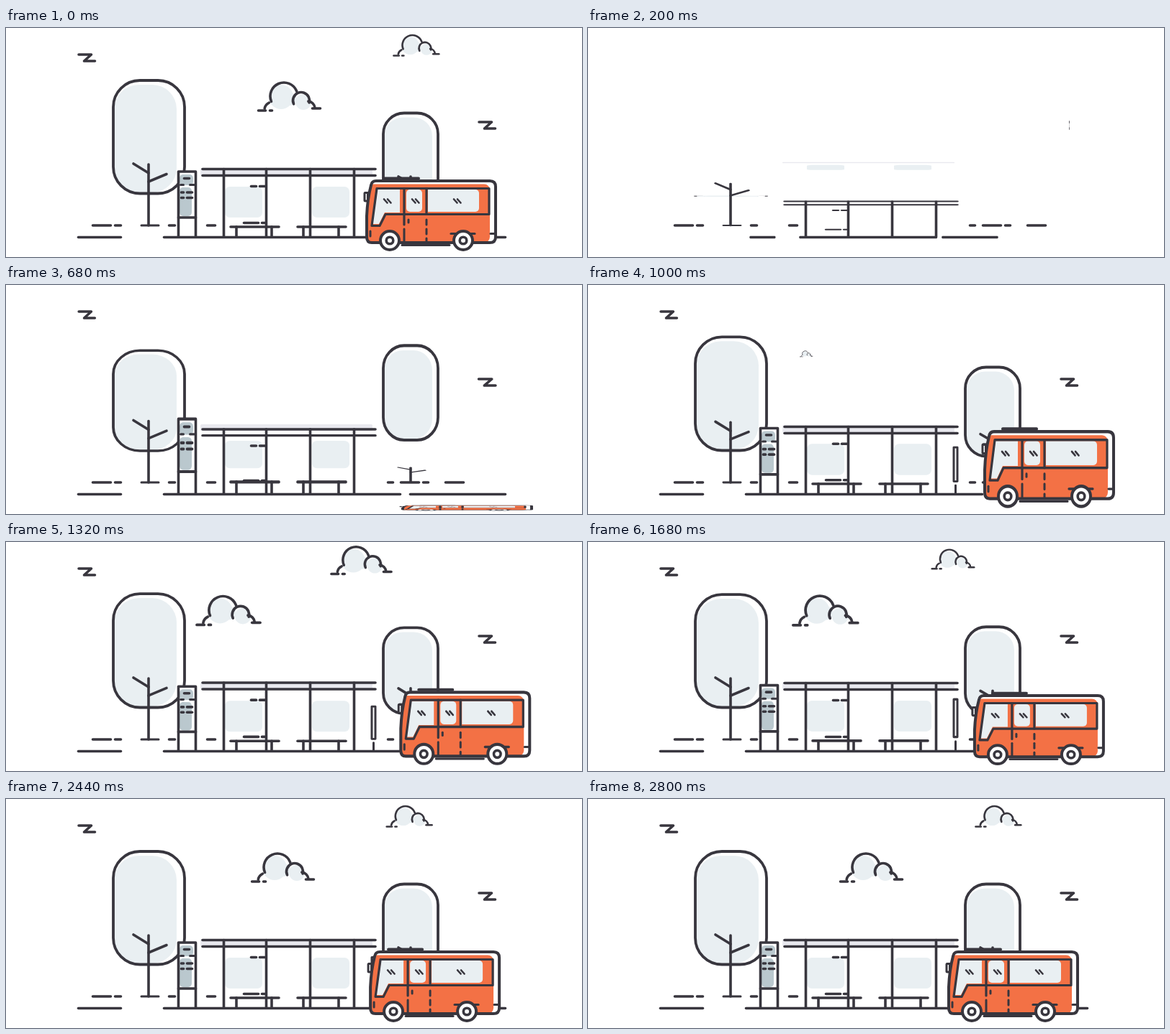
An HTML page with a canvas that plays this animation: 800x319 px, repeating every 2840 ms.

```html
<!DOCTYPE html>
<html lang="en">
<head>
<meta charset="utf-8">
<title>Bus stop</title>
<style>
html, body { margin: 0; width: 100%; height: 100%; overflow: hidden; background: #fff; }
canvas { display: block; }
</style>
</head>
<body>
<canvas id="stage" width="800" height="319"></canvas>
<script>
const ctx = document.getElementById('stage').getContext('2d');
const INK = '#38363e', PALE = '#e9eff2', GREY = '#bac8ce', ORANGE = '#f37145', WHITE = '#fff';
const LOOP = 2840, STEP = 40, WEIGHT = 3.6;
let now = 0;

// Easing
const elastic = p => p >= 1 ? 1 : 1 - 2 ** (-10 * p) * Math.cos(p * Math.PI * 2 / 0.3);
const back = p => p >= 1 ? 1 : 1 + 2.70158 * (p - 1) ** 3 + 1.70158 * (p - 1) ** 2;
const glide = start => {
  const p = Math.min(1, Math.max(0, (now - start) / (2800 - start)));
  return (1 - Math.cos(Math.PI * p)) / 2;
};

// Draws a part scaled about (x, y) on the given axes once its start time has come.
function grow({ start, time, x = 0, y = 0, axis = 'y', ease = elastic }, draw) {
  if (now <= start) return;
  const k = ease((now - start) / time);
  ctx.save();
  ctx.translate(x, y);
  ctx.scale(axis === 'y' ? 1 : k, axis === 'x' ? 1 : k);
  ctx.translate(-x, -y);
  draw();
  ctx.restore();
}

// Drawing helpers
function stroke(width = WEIGHT) {
  ctx.lineWidth = width;
  ctx.strokeStyle = INK;
  ctx.stroke();
}
function trace(points) {
  ctx.beginPath();
  for (let i = 0; i < points.length; i += 2) ctx.lineTo(points[i], points[i + 1]);
}
function line(points, width) {
  trace(points);
  stroke(width);
}
function dashes(y, ends, width) {
  for (let i = 0; i < ends.length; i += 2) line([ends[i] + 1.5, y, ends[i + 1] - 1.5, y], width);
}
function box(x1, y1, x2, y2, r, fill, width) {
  ctx.beginPath();
  ctx.roundRect(x1, y1, x2 - x1, y2 - y1, r);
  if (fill) { ctx.fillStyle = fill; ctx.fill(); }
  if (width) stroke(width);
}
function disc(x, y, r, fill, width) {
  ctx.beginPath();
  ctx.arc(x, y, r, 0, 7);
  ctx.fillStyle = fill;
  ctx.fill();
  if (width) stroke(width);
}
function arc(x, y, r, from, to) {
  ctx.beginPath();
  ctx.arc(x, y, r, from * Math.PI / 180, to * Math.PI / 180);
  stroke();
}

function crown(x1, y1, x2, y2, r, gap) {
  box(x1, y1, x2, y2, r, WHITE);
  box(x1 + 1.5, y1 + 6, x2 - gap, y2 - 1.5, r - 3, PALE);
  box(x1, y1, x2, y2, r, null, WEIGHT + 0.2);
}

function trees() {
  grow({ start: 198, time: 1550, y: 235 }, () => crown(149, 73, 248, 230.5, 37, 11));
  grow({ start: 123, time: 1470, y: 275 }, () => {
    line([198, 190, 198, 275]);
    line([177, 189, 198, 202]);
    line([198, 214, 223, 203.5]);
    line([188, 275, 212, 275], 3);
  });

  const hop = Math.min(1, Math.max(0, (now - 340) / 680));
  ctx.save();
  ctx.translate(0, -29 * Math.sin(Math.PI * hop));
  grow({ start: 316, time: 1750, y: 180 }, () => crown(524, 118.5, 600, 240, 29, 8));
  ctx.restore();
  grow({ start: 636, time: 1600, y: 275 }, () => {
    line([562, 207, 562, 275]);
    line([545, 207, 562, 217]);
    line([562, 229, 582, 220]);
    line([552, 275, 574, 275], 3);
  });
}

function shelter() {
  grow({ start: 173, time: 1620, y: 185 }, () => {
    box(270, 195, 509, 205.5, 2, '#e9e9ef');
    box(304, 221, 356, 264, 7, PALE);
    box(425, 221, 477, 264, 7, PALE);
  });
  grow({ start: 134, time: 1570, y: 291 }, () => {
    for (const y of [196.5, 205.5]) line([273, y, 513, y]);
    for (const x of [302.5, 361.5, 422.5, 483.5]) line([x, 196.5, x, 291]);
    dashes(220.5, [339, 349, 351, 361]);
    dashes(271.5, [329, 352, 354, 361]);
  });
  grow({ start: 348, time: 1750, y: 291 }, () => {
    for (const x of [311, 404]) {
      line([x + 1, 277, x + 68, 277]);
      line([x + 9, 277, x + 9, 291]);
      line([x + 58, 277, x + 58, 291]);
    }
  });
}

function timetable() {
  grow({ start: 337, time: 1750, y: 291 }, () => {
    box(239.5, 200, 263.5, 264, 0, WHITE);
    box(241, 204, 260, 219, 5, GREY);
    box(241, 222, 258, 262, 5, GREY);
    line([239.5, 291, 239.5, 200, 263.5, 200, 263.5, 291]);
    line([239.5, 264, 263.5, 264]);
    dashes(209.5, [246, 256]);
    dashes(218.5, [241, 248, 254, 263], 3);
    dashes(229, [242, 248, 250, 260]);
    dashes(236.5, [242, 248, 250, 260]);
  });
}

function stopPost() {
  grow({ start: 890, time: 1600, y: 291 }, () => {
    box(508, 220.5, 513, 272, 0, WHITE, 3);
    line([510.5, 278, 510.5, 291], 3);
  });
}

function ground() {
  dashes(275, [119, 147, 150, 161, 225, 236, 278, 292, 529, 539, 547, 575, 578, 588, 609, 637]);
  grow({ start: 122, time: 510, x: 397, axis: 'x', ease: back }, () =>
    dashes(291.5, [99, 161, 218, 549, 560, 695]));
}

function bird(x, y, start) {
  grow({ start, time: 1200, x: x + 11.5, axis: 'x' }, () =>
    line([x, y, x + 17.5, y, x + 7.5, y + 9, x + 22.5, y + 9]));
}

function cloud(x, y, size, start, anchor) {
  grow({ start, time: 1600, x, y: anchor, axis: 'xy' }, () => {
    ctx.translate(x, y);
    ctx.scale(size, size);
    disc(-11, 0, 17, PALE);
    disc(2, 3, 9, PALE);
    disc(20, 7, 11, PALE);
    arc(-7, -1, 19, 157, 340);
    arc(17, 5, 11.5, 155, 375);
    arc(-23, 18, 11, 190, 245);
    arc(26, 16, 10, 275, 355);
    dashes(19, [-44, -31, -28, -22]);
    dashes(16, [31, 45]);
  });
}

function wheel(x) {
  disc(x, 296, 13, WHITE, 4);
  disc(x, 296, 4.8, WHITE, 3.6);
}

function busBody() {
  ctx.beginPath();
  ctx.moveTo(514, 213);
  ctx.lineTo(672, 213);
  ctx.quadraticCurveTo(680, 213, 680, 221);
  ctx.lineTo(680, 291);
  ctx.quadraticCurveTo(680, 299, 672, 299);
  ctx.lineTo(508, 299);
  ctx.quadraticCurveTo(501, 299, 501, 291);
  ctx.lineTo(501, 262);
  ctx.quadraticCurveTo(502, 238, 507, 219);
  ctx.quadraticCurveTo(508, 213, 514, 213);
}

function bus() {
  ctx.save();
  ctx.translate(50 * (1 - glide(1060)), 0);
  grow({ start: 665, time: 1615, y: 315 }, () => {
    line([526, 209.5, 573, 209.5], 4);
    box(498, 229.5, 502.5, 241, 1, WHITE, 3);
    line([499, 229.5, 507, 229.5], 3);

    busBody();
    ctx.fillStyle = WHITE;
    ctx.fill();
    ctx.save();
    ctx.clip();
    box(500, 217.5, 672, 299, [8, 8, 8, 0], ORANGE);
    ctx.restore();

    // Glass
    trace([516, 225, 547, 225, 547, 257, 526, 257, 518, 273, 509, 273]);
    ctx.fillStyle = PALE;
    ctx.fill();
    box(556, 225, 578, 256, 5, PALE);
    box(586, 225, 657, 256, [0, 5, 5, 0], PALE);
    for (const x of [530, 569, 627]) {
      line([x - 5, 238.5, x - 0.5, 243.5], 2.6);
      line([x, 238.5, x + 4.5, 243.5], 2.6);
    }

    // Frames, door and trim
    line([508, 275.5, 515, 223.5, 671, 223.5, 671, 259.5, 527, 259.5, 519, 275.5, 508, 275.5], 3.2);
    line([553, 223.5, 553, 274], 3.2);
    line([584, 223.5, 584, 259.5], 3.2);
    for (const [x, top, end] of [[553, 280, 297], [559, 267, 271], [584, 267, 274], [584, 280, 287], [584, 293, 297], [506, 283, 290]])
      line([x, top, x, end], 3);
    line([618, 286.5, 651, 286.5], 3.2);
    line([673, 286.5, 679, 286.5], 3);
    busBody();
    stroke(4);
    line([550, 302.5, 616, 302.5], 3);
    wheel(533);
    wheel(635);
  });
  ctx.restore();
}

function render(time) {
  const tick = Math.floor(time % LOOP / STEP) * STEP;
  now = tick || LOOP;
  ctx.setTransform(1, 0, 0, 1, 0, 0);
  ctx.fillStyle = WHITE;
  ctx.fillRect(0, 0, 800, 319);
  ctx.lineCap = ctx.lineJoin = 'round';

  bird(101, 37, 240);
  bird(657, 131, 194);
  cloud(393 - 90 * (1 - glide(1040)), 96, 1, 968, 96);
  cloud(569.5 - 77 * (1 - glide(1240)), 24.6, 0.73, 1140, 20);
  trees();
  shelter();
  timetable();
  stopPost();
  ground();
  bus();
}

let origin;
function loop(stamp) {
  origin ??= stamp;
  render(stamp - origin);
  requestAnimationFrame(loop);
}
render(0);
requestAnimationFrame(loop);
</script>
</body>
</html>
```
